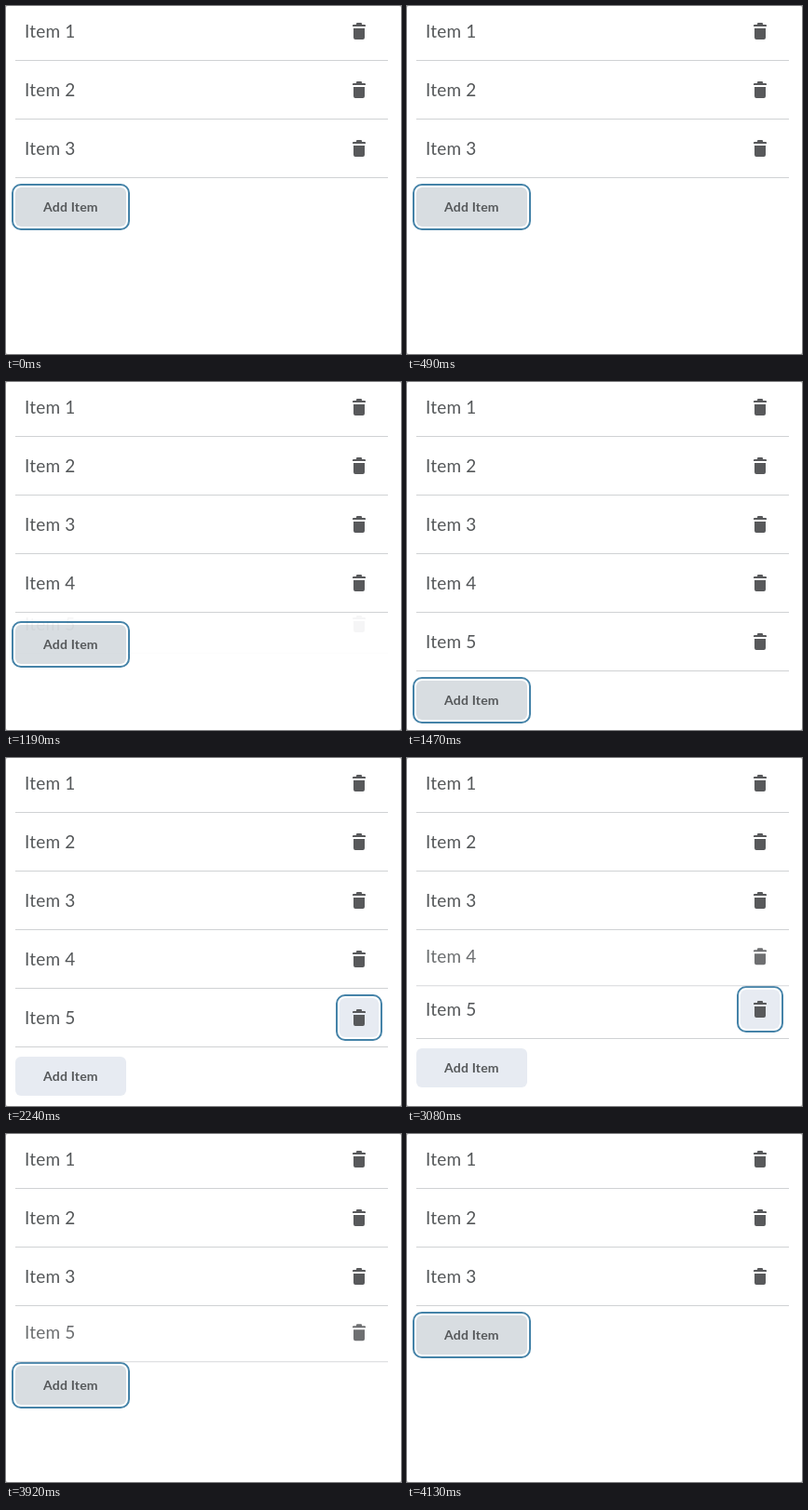
An HTML page that plays this animation: 424 px wide and 374 px high, repeating every 6020 ms.

```html
<!DOCTYPE html>
<html lang="en">
<head>
<meta charset="utf-8">
<title>Animated list</title>
<style>
  html, body { margin: 0; width: 100%; height: 100%; overflow: hidden; background: #bbb; }
  svg { display: block; width: 424px; height: 374px; background: #fff; border-radius: 2px; }
  text { font-family: Lato, sans-serif; fill: #55585a; letter-spacing: .2px; }
  .label { font-size: 19px; }
  .caption { font-size: 14px; font-weight: 700; }
  .icon { fill: #58595b; }
  .line { fill: #d0d2d4; }
  .ring { fill: #fff; stroke: #4583a8; stroke-width: 2; }
  .face { fill: #e7ebf2; }
  .add.focus .face { fill: #d8dde1; }
  .button:not(.focus) .ring, .remove:not(.focus) .face { display: none; }
</style>
</head>
<body>
<svg id="stage" viewBox="0 0 424 374"></svg>
<script>
const LOOP = 6020, TICK = 70, ROW = 63, SHIFT = 20, SHOW = 300, HIDE = 200;
const stage = document.getElementById('stage');

// When each temporary row starts to appear and to leave
const spans = { 4: [517, 3055], 5: [1170, 3895] };
// Which button holds the focus from each time on
const focusSteps = [[0, 'add'], [2240, 5], [2450, 4], [3080, 5], [3920, 'add']];

const button = (name, x, y, w, content) => `
  <g class="button ${name}">
    <rect class="ring" x="${x - 3}" y="${y - 3}" width="${w + 6}" height="48" rx="9"/>
    <rect class="face" x="${x}" y="${y}" width="${w}" height="42" rx="6"/>
    ${content}
  </g>`;

const trash = `<path class="icon" d="M376 20v-1q0-1 1-1h4q1 0 1 1v1h3q1 0 1 1v1h-14v-1q0-1 1-1z
  M373 24h12v10q0 2-2 2h-8q-2 0-2-2z"/>`;

const row = n => `
  <g id="row${n}">
    <text class="label" x="20" y="34">Item ${n}</text>
    ${button('remove', 358, 6, 42, trash)}
    <rect class="line" x="10" y="58" width="400" height="1"/>
  </g>`;

stage.innerHTML =
  `<g id="add">${button('add', 10, 6, 119, '<text class="caption" x="40" y="32">Add Item</text>')}</g>` +
  [1, 2, 3, 5, 4].map(row).join('');

const addBox = document.getElementById('add');
const rows = [1, 2, 3, 4, 5].map(n => document.getElementById('row' + n));
const buttons = { add: addBox.firstElementChild };
rows.forEach((el, i) => buttons[i + 1] = el.querySelector('.button'));

// CSS "ease": cubic-bezier(.25, .1, .25, 1)
function ease(x) {
  if (x <= 0) return 0;
  if (x >= 1) return 1;
  const curve = (a, b, u) => 3 * a * u * (1 - u) ** 2 + 3 * b * u * u * (1 - u) + u ** 3;
  let lo = 0, hi = 1;
  for (let i = 0; i < 24; i++) {
    const mid = (lo + hi) / 2;
    if (curve(.25, .25, mid) < x) lo = mid; else hi = mid;
  }
  return curve(.1, 1, lo);
}

function presence(n, t) {
  if (!spans[n]) return 1;
  const [enter, leave] = spans[n];
  return ease((t - enter) / SHOW) - ease((t - leave) / HIDE);
}

function draw(t) {
  let top = 0;
  rows.forEach((el, i) => {
    const p = presence(i + 1, t);
    el.style.display = p > 0 ? '' : 'none';
    el.setAttribute('opacity', p);
    el.setAttribute('transform', `translate(0 ${Math.round(top) - SHIFT * (1 - p)})`);
    top += ROW * p;
  });
  addBox.setAttribute('transform', `translate(0 ${Math.round(top)})`);
  const focused = focusSteps.filter(([start]) => start <= t).pop()[1];
  for (const key in buttons) buttons[key].classList.toggle('focus', key === String(focused));
}

const origin = performance.now();
function frame() {
  const t = (performance.now() - origin) % LOOP;
  draw(Math.floor(t / TICK) * TICK);
  requestAnimationFrame(frame);
}
frame();
</script>
</body>
</html>
```
